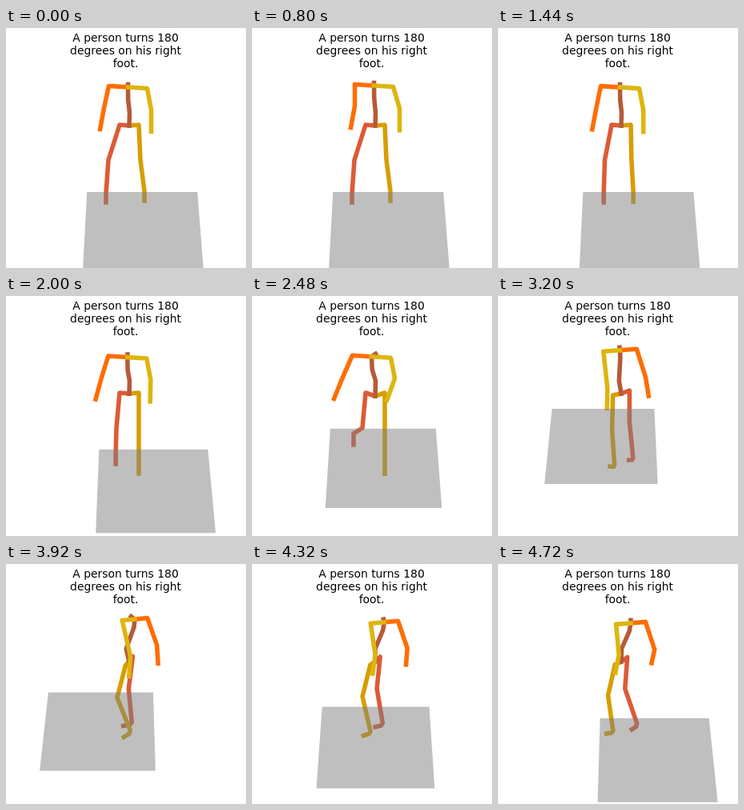
An HTML page with a canvas for the animation above (4800 ms loop, 300 px wide and 300 px high).

```html
<!DOCTYPE html>
<html lang="en">
<head>
<meta charset="utf-8">
<title>A person turns</title>
<style>
  html, body { margin: 0; width: 100%; height: 100%; overflow: hidden; background: #fff; }
  canvas { display: block; width: 300px; height: 300px; }
</style>
</head>
<body>
<canvas id="stage" width="300" height="300"></canvas>
<script>
const LOOP = 4800, STEP = 80;
const HIP_X = 154, HIP_Y = 121, DEPTH_TILT = 0.5;
const RIGHT = -1, LEFT = 1;
const ctx = document.getElementById("stage").getContext("2d");
const caption = ["A person turns 180", "degrees on his right", "foot."];

const rad = degrees => degrees * Math.PI / 180;

// Eased step from 0 to 1 between two times
function ramp(t, from, to) {
  const u = Math.min(1, Math.max(0, (t - from) / (to - from)));
  return u * u * (3 - 2 * u);
}

// Bell curve that peaks at 1
const pulse = (t, peak, width) => Math.exp(-(((t - peak) / width) ** 2));

// Body directions (to the person's left, forward, down) as a screen offset
function project(left, forward, down, yaw) {
  const a = rad(yaw);
  const depth = left * Math.sin(a) + forward * Math.cos(a);
  return [left * Math.cos(a) - forward * Math.sin(a), down + DEPTH_TILT * depth];
}

// Follows bones from a joint; pitch swings a bone forward, out moves it sideways
function limb([x, y], side, yaw, bones) {
  const joints = [[x, y]];
  for (const { down, forward = 0, pitch = 0, out = 0 } of bones) {
    const c = Math.cos(rad(pitch)), s = Math.sin(rad(pitch));
    const [dx, dy] = project(side * out, forward * c + down * s, down * c - forward * s, yaw);
    joints.push([x += dx, y += dy]);
  }
  return joints;
}

function leg(side, yaw, thighPitch, knee, thighOut, shinOut) {
  const [dx, dy] = project(side * 12, 0, 0, yaw);
  const pitch = thighPitch - knee;
  return limb([HIP_X + dx, HIP_Y + dy], side, yaw, [
    { down: 44, pitch: thighPitch, out: thighOut },
    { down: 42, pitch, out: shinOut },
    { down: 3, forward: 3, pitch },
    { down: 2, forward: 9, pitch }
  ]);
}

function arm(side, yaw, neck, upper, lower) {
  const shoulder = [neck[0] + side * 24 * Math.cos(rad(yaw)), neck[1] + side * 1.5];
  return limb(shoulder, side, yaw, [upper, lower]);
}

function strokeChain(joints, color) {
  ctx.strokeStyle = color;
  ctx.beginPath();
  for (const [x, y] of joints) ctx.lineTo(x, y);
  ctx.stroke();
}

function drawBody(t) {
  const turn = 150 * ramp(t, 2480, 3200);
  const settle = 38 * ramp(t, 3200, 3920) - 18 * ramp(t, 3920, 4720);
  const hipYaw = turn - settle, chestYaw = turn - settle / 2;
  const lift = pulse(t, 2480, 500);
  const shift = pulse(t, 800, 400);
  const narrow = ramp(t, 800, 2000);
  const stride = ramp(t, 3000, 3900);

  const root = [HIP_X, HIP_Y + 1 + 3 * pulse(t, 2480, 250)];
  const neckX = -1.5 - 3 * pulse(t, 2480, 400) + 13.5 * ramp(t, 3100, 4500);
  const neckY = 74 - 2 * shift + 3 * pulse(t, 2200, 500) - 8 * pulse(t, 3500, 600);
  const neck = [HIP_X + neckX, neckY];
  const chest = [HIP_X + 0.85 * neckX, neckY + 16 - turn / 25];
  const waist = [HIP_X + 0.5 - 7 * pulse(t, 3600, 450), HIP_Y - 15];
  const head = [neck[0] + 5 * pulse(t, 2480, 250) - 5 * pulse(t, 3800, 400), neckY - 3.5];

  const rightLeg = leg(RIGHT, hipYaw, turn / 16,
    55 * lift + turn / 10 + 22 * pulse(t, 4720, 350),
    14 - 10 * narrow, 3 * (1 - narrow) + 11 * pulse(t, 2480, 300));
  const leftLeg = leg(LEFT, hipYaw, 14 * pulse(t, 2250, 550) + 15 * stride,
    8 + 18 * stride + 14 * pulse(t, 3920, 400),
    2 - 2 * narrow, 5 * (1 - narrow));

  const rightArm = arm(RIGHT, chestYaw, neck,
    { down: 34, pitch: -18, out: 6 - 6 * shift + 6 * lift },
    { down: 26, pitch: 5 + 22 * ramp(t, 3900, 4720), out: 5 + 6 * lift });
  const leftArm = arm(LEFT, chestYaw, neck,
    { down: 34 + 12 * pulse(t, 3550, 500), pitch: -18 - 10 * pulse(t, 3500, 900), out: 5 + 3 * shift },
    { down: 26, pitch: 5 + 10 * ramp(t, 3900, 4720), out: -11 * pulse(t, 2600, 350) });

  ctx.lineWidth = 5.56;
  ctx.lineCap = "square";
  ctx.lineJoin = "round";
  strokeChain([root, ...rightLeg], "#dd5a37");
  strokeChain([root, ...leftLeg], "#d69e00");
  strokeChain([root, waist, chest, neck, head], "#b75a39");
  strokeChain([neck, ...rightArm], "#ff6d00");
  strokeChain([neck, ...leftArm], "#ddb50e");
}

function drawFloor(t) {
  const depth = 77.5 * (1 - ramp(t, 1500, 3200)) + 67 * ramp(t, 3200, 5000);
  const x = 171.6 + 17 * ramp(t, 1150, 1900) - 26 * ramp(t, 1900, 2600)
    - 52 * ramp(t, 2450, 3700) + 99 * ramp(t, 3780, 4950);
  const near = 235 + depth, far = 141 + 0.826 * depth;
  const farX = 117.5 + 0.9075 * (x - 113.5);
  const nearHalf = 70.75 + 0.069 * depth, farHalf = 64 + 0.065 * depth;
  ctx.fillStyle = "rgba(128, 128, 128, 0.5)";
  ctx.beginPath();
  ctx.moveTo(farX - farHalf, far);
  ctx.lineTo(farX + farHalf, far);
  ctx.lineTo(x + nearHalf, near);
  ctx.lineTo(x - nearHalf, near);
  ctx.fill();
}

function drawCaption() {
  ctx.fillStyle = "#000";
  ctx.font = '13.89px "DejaVu Sans", sans-serif';
  ctx.textAlign = "center";
  caption.forEach((line, i) => ctx.fillText(line, 149.5, 17 + 16 * i));
}

const start = performance.now();

function render() {
  const elapsed = (performance.now() - start) % LOOP;
  const t = Math.floor(elapsed / STEP) * STEP;
  ctx.fillStyle = "#fff";
  ctx.fillRect(0, 0, 300, 300);
  drawBody(t);
  drawFloor(t);
  drawCaption();
  requestAnimationFrame(render);
}
render();
</script>
</body>
</html>
```
